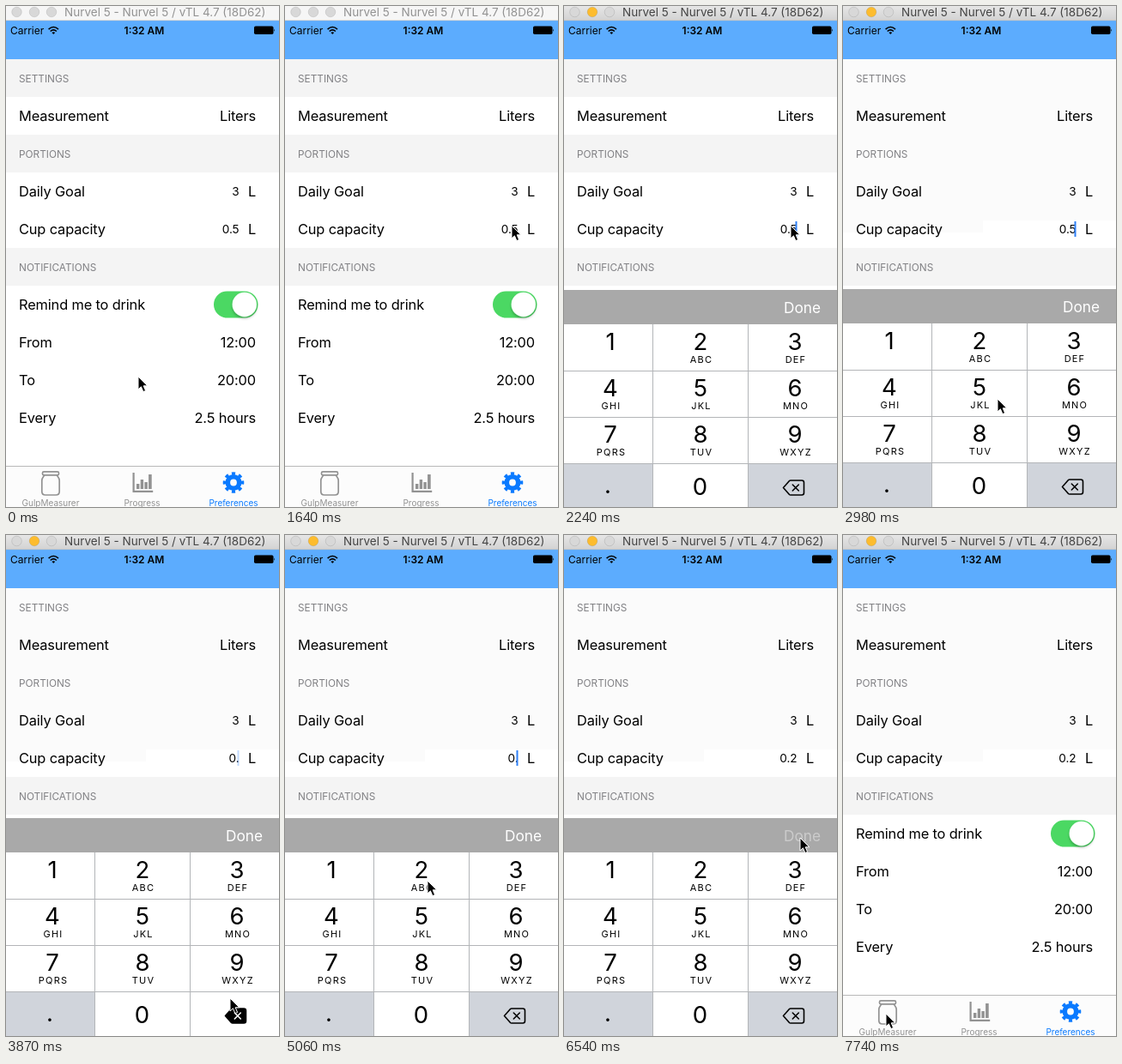
Recreate the animation shown at these times as an HTML page. Size 318 by 584 pixels, loop 8000 ms.

```html
<!DOCTYPE html>
<html lang="en">
<head>
<meta charset="utf-8">
<title>Drink settings</title>
<style>
html, body { margin: 0; width: 100%; height: 100%; overflow: hidden; background: #fff; }
svg { display: block; width: 318px; height: 584px; }
text { font-family: Inter, Roboto, "Liberation Sans", sans-serif; }
.row { font-size: 16.4px; letter-spacing: -.15px; }
.head { font-size: 11.8px; fill: #808084; }
.value { font-size: 13.6px; letter-spacing: -.1px; }
.small { font-size: 12px; }
.tab { font-size: 10px; text-anchor: middle; fill: #929292; }
.digit { font-size: 27.5px; text-anchor: middle; }
.letters { font-size: 11px; letter-spacing: 1.2px; text-anchor: middle; }
.end { text-anchor: end; }
</style>
</head>
<body>
<svg viewBox="0 0 318 584">
  <defs>
    <linearGradient id="chrome" x2="0" y2="1">
      <stop stop-color="#e6e6e6"/><stop offset="1" stop-color="#d2d2d2"/>
    </linearGradient>
    <filter id="soft" x="-30%" y="-30%" width="160%" height="170%">
      <feDropShadow dx="0" dy="2" stdDeviation="1.5" flood-opacity=".28"/>
    </filter>
  </defs>
  <rect width="318" height="584" fill="#fff"/>

  <g id="list"></g>
  <text id="cup" class="value end" x="271.5" y="265">0.5</text>
  <rect id="caret" x="269.5" y="251" width="2" height="18" fill="#2f80f8"/>

  <g id="toggle">
    <rect x="242" y="332.5" width="51.5" height="31" rx="15.5" fill="#4bd863"/>
    <circle cx="277.8" cy="348" r="14.2" fill="#fff" filter="url(#soft)"/>
  </g>

  <g id="tabs">
    <rect y="536" width="318" height="48" fill="#fcfcfc"/>
    <path d="M0 536.5H318" stroke="#b8b8b8"/>
    <g fill="none" stroke="#929292" stroke-width="1.7">
      <rect x="42.5" y="542.8" width="19" height="4" rx="1.6"/>
      <path d="M44.5 547C44 549 41.8 550 41.8 553V566Q41.8 570 46 570H58Q62.2 570 62.2 566V553C62.2 550 60 549 59.5 547"/>
    </g>
    <path d="M147.5 544h2.2v20.8h21.5v2.2h-23.7zM152 557h3.4v6H152zM156.7 552h3.4v11h-3.4zM161.4 555h3.4v8h-3.4zM166.1 546h3.6v17h-3.6z" fill="#929292"/>
    <g fill="none" stroke="#0a7aff">
      <circle cx="265" cy="555.5" r="6.7" stroke-width="5.6"/>
      <circle cx="265" cy="555.5" r="10.5" stroke-width="3.6" pathLength="16" stroke-dasharray="1 1" stroke-dashoffset=".5"/>
    </g>
    <text class="tab" x="52" y="583">GulpMeasurer</text>
    <text class="tab" x="158.5" y="583">Progress</text>
    <text class="tab" x="265" y="583" style="fill:#0a7aff">Preferences</text>
  </g>

  <g id="keyboard">
    <rect y="330" width="318" height="40" fill="#a9a9a9"/>
    <text id="done" x="256" y="357" font-size="17.3" fill="#fff">Done</text>
    <rect y="370" width="318" height="216" fill="#fff"/>
    <rect y="532" width="103" height="54" fill="#d0d4db"/>
    <rect id="eraseKey" x="215" y="532" width="103" height="54"/>
    <rect id="twoKey" x="104" y="370" width="110" height="54"/>
    <path d="M0 424.5H318M0 478.5H318M0 532.5H318M103.5 370V586M214.5 370V586" stroke="#b3b5b8"/>
    <g id="keys"></g>
    <g stroke-width="1.6" stroke-linejoin="round" stroke-linecap="round">
      <path id="eraseShape" d="M255.5 560.5L262.5 552.5Q263 552 264 552H277Q279.5 552 279.5 554.5V566.5Q279.5 569 277 569H264Q263 569 262.5 568.5Z" stroke="#000"/>
      <path id="eraseCross" d="M266.3 557l7 7m0-7l-7 7"/>
    </g>
  </g>

  <g id="top">
    <rect y="17" width="318" height="45" fill="#5cacfe"/>
    <rect id="bar" width="318" height="17"/>
    <path d="M0 16.8H318" stroke="#b9b9b9" stroke-width=".6"/>
    <g stroke="#000" stroke-opacity=".1">
      <circle cx="12.5" cy="7" r="5.8" fill="#d8d8d8"/>
      <circle id="amber" cx="33" cy="7" r="5.8"/>
      <circle cx="53" cy="7" r="5.8" fill="#d8d8d8"/>
    </g>
    <text id="title" x="68" y="12" font-size="13.5">Nurvel 5 - Nurvel 5 / vTL 4.7 (18D62)</text>
    <text class="small" x="5" y="32.5">Carrier</text>
    <g fill="none" stroke="#000" stroke-width="1.6">
      <path d="M49.6 27.2Q55.3 21.8 61 27.2M51.7 29.5Q55.3 26.2 58.9 29.5"/>
      <path d="M53.4 31L55.3 33L57.2 31Q55.3 29.4 53.4 31Z" fill="#000" stroke="none"/>
    </g>
    <text class="small" x="161" y="32.5" text-anchor="middle" font-weight="600">1:32 AM</text>
    <rect x="289" y="23.5" width="22.5" height="9.5" rx="1.8"/>
    <path d="M312.3 26.5Q314 28.2 312.3 30Z"/>
  </g>

  <path id="pointer" d="M0 0V15L3.4 11.8L5.9 17.6L8.6 16.4L6.2 10.8H10.8Z" stroke="#fff" stroke-width="1" stroke-linejoin="round"/>
</svg>
<script>
const $ = id => document.getElementById(id);
const LOOP = 8000;

// Static content
const label = (cls, x, y, s) => `<text class="${cls}" x="${x}" y="${y}">${s}</text>`;
const sections = [[62, 'SETTINGS'], [150, 'PORTIONS'], [282, 'NOTIFICATIONS']];
const rows = [
  [106, 'Measurement', 'Liters'], [194, 'Daily Goal', 'L'], [238, 'Cup capacity', 'L'],
  [326, 'Remind me to drink', ''], [370, 'From', '12:00'], [414, 'To', '20:00'],
  [458, 'Every', '2.5 hours']
];
$('list').innerHTML =
  sections.map(([y]) => `<rect y="${y}" width="318" height="44" fill="#f4f4f4"/>`).join('') +
  '<path id="wash" d="M0 62H318V250H163V264H0Z" fill="#fbfbfb"/>' +
  sections.map(([y, s]) => label('head', 15, y + 26.5, s)).join('') +
  rows.map(([y, a, b]) => label('row', 15, y + 28, a) + label('row end', 291, y + 28, b)).join('') +
  label('value end', 271.5, 221, '3');

const centers = [54, 159, 269];
$('keys').innerHTML = ['', 'ABC', 'DEF', 'GHI', 'JKL', 'MNO', 'PQRS', 'TUV', 'WXYZ'].map((s, i) => {
  const x = centers[i % 3], y = 400 + 54 * Math.floor(i / 3);
  return label('digit', x, y, i + 1) + label('letters', x + 1, y + 15, s);
}).join('') + label('digit', 51, 567, '.') + label('digit', 158.5, 569, '0');

// Steps: [time, value...], each held until the next
const pointer = [
  [0, 154, 432], [1050, 165, 419], [1200, 203, 366], [1350, 239, 305], [1490, 258, 268], [1640, 264, 256],
  [2390, 254, 300], [2530, 214, 396], [2680, 180, 458],
  [3270, 202, 492], [3420, 242, 530], [3570, 261, 540],
  [4470, 246, 520], [4620, 216, 471], [4770, 189, 431], [4910, 172, 409], [5060, 166, 403],
  [5500, 200, 391], [5650, 236, 372], [5800, 262, 359], [5950, 273, 354], [6100, 275, 353],
  [6700, 262, 382], [6850, 236, 450], [6990, 196, 530], [7140, 160, 565],
  [7440, 124, 566], [7590, 75, 561], [7740, 50, 558]
];
const keyboard = [
  [0, 260], [1940, 130], [2090, 14], [2240, 1], [2390, 0],
  [6550, 120], [6700, 243], [6850, 260]
];
const caret = [
  [0, 0], [1790, 1], [2680, 0], [2980, 1], [3420, 0], [3570, 1], [3870, .3], [4020, 1],
  [4470, 0], [4910, 1], [5500, 0], [5650, 1], [6100, 0]
];
const cup = [[0, '0.5'], [3870, '0.'], [5210, '0.2']];

const at = (steps, t) => steps.findLast(s => s[0] <= t).slice(1);
const within = (t, a, b) => t >= a && t < b;
const paint = (id, name, value) => $(id).setAttribute(name, value);

function draw(t) {
  const active = t >= 1790, erasing = within(t, 3870, 4020);
  paint('bar', 'fill', active ? 'url(#chrome)' : '#f6f6f6');
  paint('title', 'fill', active ? '#444' : '#929292');
  paint('amber', 'fill', active ? '#fdbc2e' : '#d8d8d8');
  paint('wash', 'opacity', t >= 2390 ? 1 : 0);
  paint('pointer', 'transform', `translate(${at(pointer, t)})`);
  paint('keyboard', 'transform', `translate(0 ${at(keyboard, t)})`);
  paint('caret', 'opacity', at(caret, t));
  $('cup').textContent = at(cup, t);
  paint('done', 'opacity', within(t, 6400, 6550) ? .4 : 1);
  paint('twoKey', 'fill', within(t, 5210, 5350) ? '#d0d4db' : '#fff');
  paint('eraseKey', 'fill', erasing ? '#fff' : '#d0d4db');
  paint('eraseShape', 'fill', erasing ? '#000' : 'none');
  paint('eraseCross', 'stroke', erasing ? '#fff' : '#000');
}

const start = performance.now();
function tick() {
  draw((performance.now() - start) % LOOP);
  requestAnimationFrame(tick);
}
tick();
</script>
</body>
</html>
```
